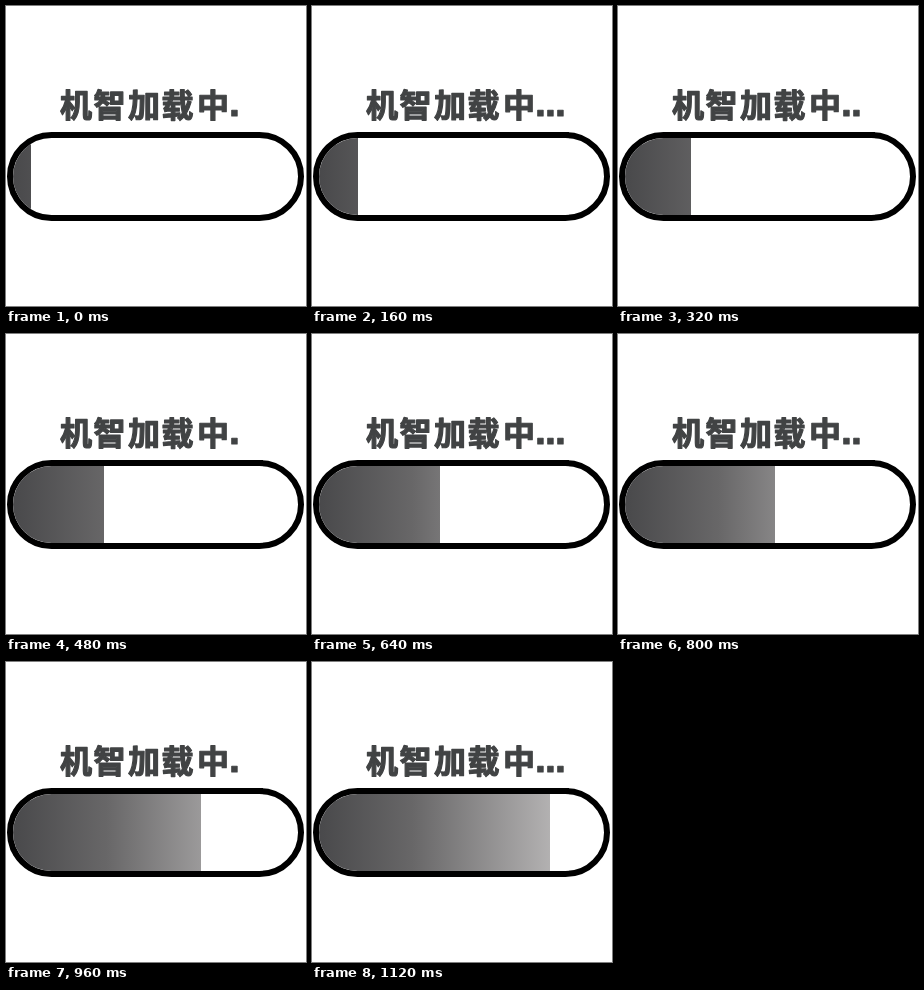
Write an HTML page that moves like this. It is 300x300 px and loops after 1.28 s.

```html
<!DOCTYPE html>
<html lang="zh-CN">
<head>
<meta charset="utf-8">
<title>Loading bar</title>
<style>
  html, body { margin: 0; width: 100%; height: 100%; overflow: hidden; background: #fff; }
  svg { display: block; width: 100vw; height: 100vh; }
  text {
    font: 900 32px "Noto Sans CJK SC", "Noto Sans CJK", sans-serif;
    fill: #414344;
    stroke: #414344;
    stroke-width: 1.2;
    stroke-linejoin: round;
  }
  #dots { font: bold 30px "DejaVu Sans", sans-serif; }
</style>
</head>
<body>
<svg viewBox="0 0 300 300">
  <defs>
    <linearGradient id="shade" gradientUnits="userSpaceOnUse" x1="7" y1="0" x2="292" y2="0">
      <stop offset="0" stop-color="#49494b"/>
      <stop offset="0.33" stop-color="#686768"/>
      <stop offset="1" stop-color="#d0cece"/>
    </linearGradient>
    <clipPath id="pill"><rect x="7" y="132" width="285" height="77" rx="38.5"/></clipPath>
  </defs>
  <text x="54 87.5 122 155.5 191" y="111">机智加载中</text>
  <text id="dots" x="222.8 232.8 242.8" y="110.4"></text>
  <rect x="4" y="129" width="291" height="83" rx="41.5" fill="#fff" stroke="#000" stroke-width="6"/>
  <g clip-path="url(#pill)">
    <rect id="fill" x="7" y="132" height="77" fill="url(#shade)"/>
  </g>
</svg>
<script>
  const STEP = 160;
  const fillEdges = [25, 46, 73, 98, 128, 157, 195, 238];
  const dotStates = [".", "...", ".."];
  const fill = document.getElementById("fill");
  const dots = document.getElementById("dots");
  const start = performance.now();

  function draw(now) {
    const step = Math.floor((now - start) / STEP + 1e-6) % fillEdges.length;
    fill.setAttribute("width", fillEdges[step] - 7);
    dots.textContent = dotStates[step % dotStates.length];
  }

  function loop() {
    draw(performance.now());
    requestAnimationFrame(loop);
  }

  loop();
</script>
</body>
</html>
```
